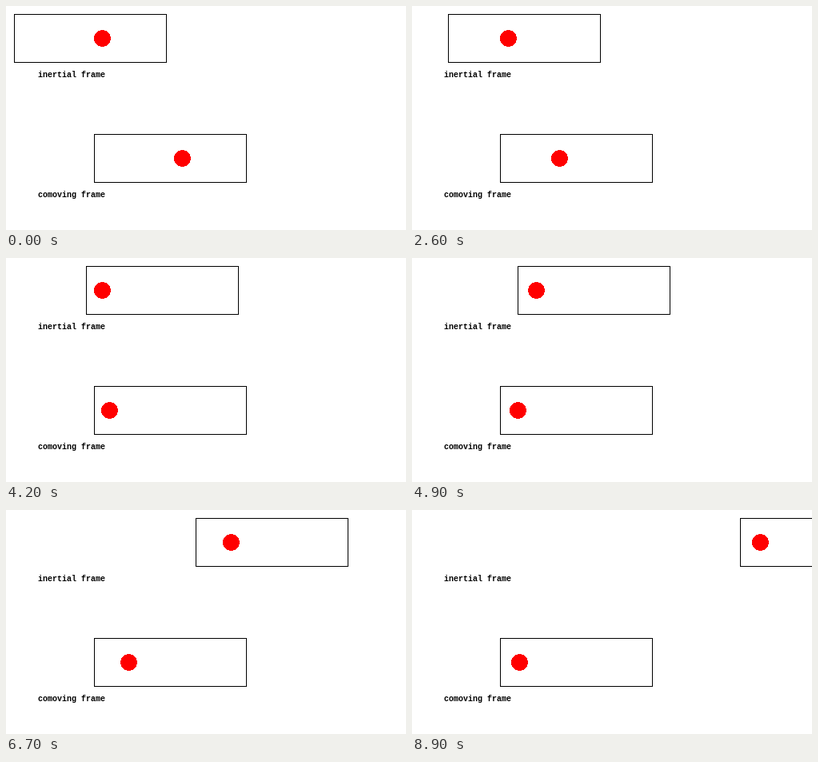
Animation, 500 px wide and 280 px high, one loop 9 s. Source, as an HTML page:

```html
<!DOCTYPE html>
<html lang="en">
<head>
<meta charset="utf-8">
<title>Inertial and comoving frames</title>
<style>
  html, body { margin: 0; overflow: hidden; background: #fff; }
  svg { display: block; shape-rendering: crispEdges; }
  rect { fill: none; stroke: #000; }
  circle { fill: #f00; }
  text { font: bold 10px "Liberation Mono", monospace; white-space: pre; }
</style>
</head>
<body>
<svg width="500" height="280" viewBox="0 0 500 280">
  <rect id="box" x="10.5" y="10.5" width="190" height="60"/>
  <circle id="ball" cx="120.5" cy="40.5" r="10.5"/>
  <text x="40" y="89">inertial frame</text>

  <rect x="110.5" y="160.5" width="190" height="60"/>
  <circle id="comovingBall" cx="220.5" cy="190.5" r="10.5"/>
  <text x="40" y="239">comoving frame</text>
</svg>
<script>
  const STEP = 100, STEPS = 90;
  const HIT_STEP = 44, BALL_SPEED = 7;
  const [box, ball, comovingBall] =
    ["box", "ball", "comovingBall"].map(id => document.getElementById(id));

  const shift = (el, x) => el.setAttribute("transform", `translate(${Math.floor(x)} 0)`);

  function draw() {
    const n = Math.floor(performance.now() / STEP) % STEPS;
    // The box accelerates steadily; the ball rests until the wall hits it.
    const boxX = n * (n + 1) / 20;
    const ballX = BALL_SPEED * Math.max(0, n - HIT_STEP);
    shift(box, boxX);
    shift(ball, ballX);
    shift(comovingBall, ballX - boxX);
    requestAnimationFrame(draw);
  }
  draw();
</script>
</body>
</html>
```
